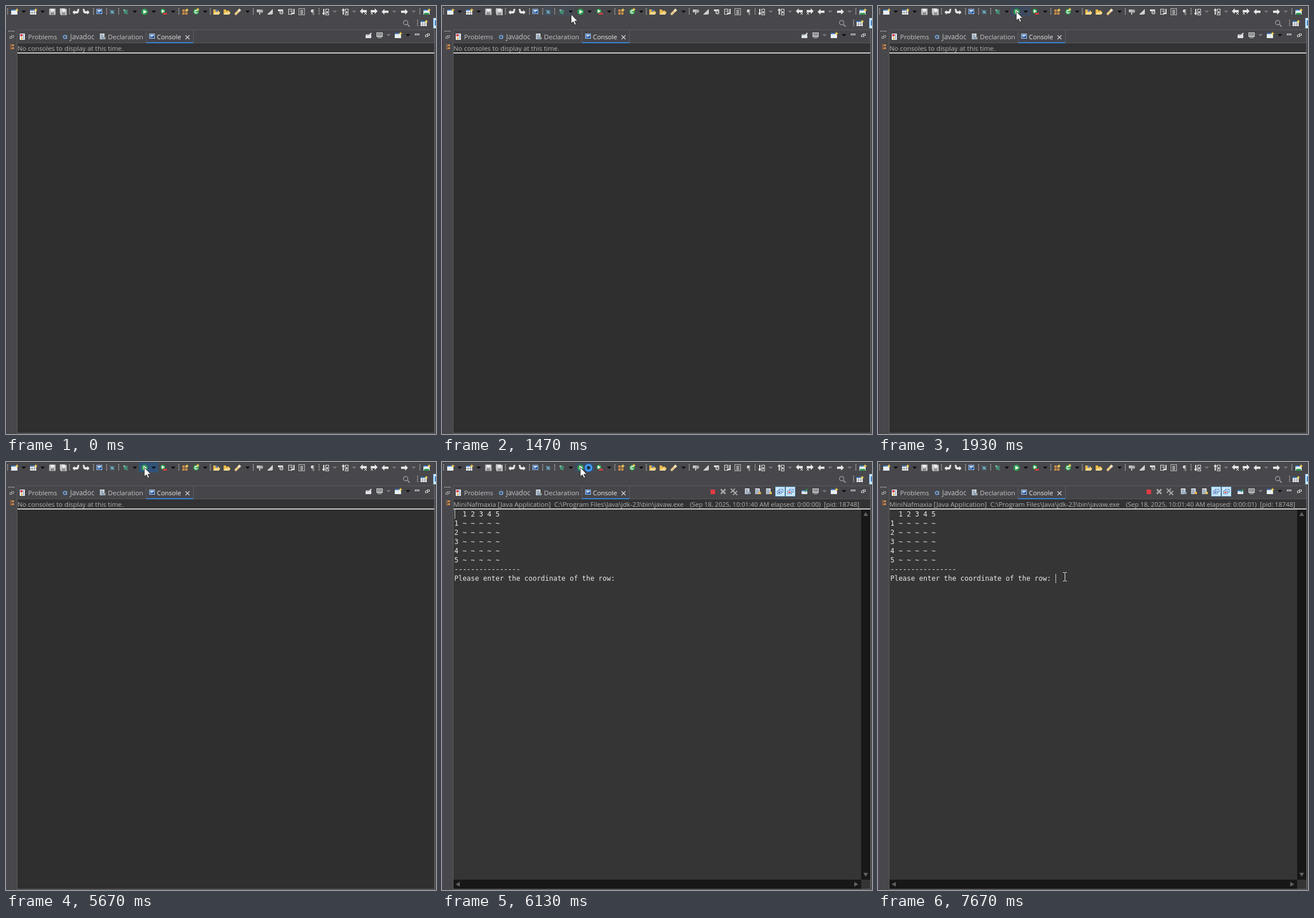
Animation of 751 by 746 pixels, one loop 8000 ms. Source, as an HTML page with a canvas:

```html
<!DOCTYPE html>
<html lang="en">
<head>
<meta charset="utf-8">
<title>Console</title>
<style>
html, body { margin: 0; width: 100%; height: 100%; overflow: hidden; background: #48484c; }
canvas { display: block; }
</style>
</head>
<body>
<canvas id="stage" width="751" height="746"></canvas>
<script>
const g = document.getElementById('stage').getContext('2d');
const UI = '"Open Sans", "Noto Sans", sans-serif', MONO = '"DejaVu Sans Mono", monospace';
const BAR = '#48484c', WHITE = '#e6e6e6', GREY = '#9a9a9a', BLUE = '#3d7cc9', GOLD = '#e8b64c', GREEN = '#2f9e4f';

// Drawing helpers
function rect(x, y, w, h, c) { g.fillStyle = c; g.fillRect(x, y, w, h); }
function trace(p, x, y) {
  g.beginPath();
  for (let i = 0; i < p.length; i += 2) g.lineTo(x + p[i], y + p[i + 1]);
}
function poly(x, y, p, c) { trace(p, x, y); g.closePath(); g.fillStyle = c; g.fill(); }
function line(x, y, p, c, w = 1) { trace(p, x, y); g.strokeStyle = c; g.lineWidth = w; g.stroke(); }
function disc(x, y, r, c) { g.beginPath(); g.arc(x, y, r, 0, 7); g.fillStyle = c; g.fill(); }
function ring(x, y, r, c, w) { g.beginPath(); g.arc(x, y, r, 0, 7); g.strokeStyle = c; g.lineWidth = w; g.stroke(); }
function box(x, y, w, h, c) { g.strokeStyle = c; g.lineWidth = 1; g.strokeRect(x + .5, y + .5, w - 1, h - 1); }
function text(s, x, y, c, size = 11.45, font = UI) {
  g.font = size + 'px ' + font; g.fillStyle = c; g.fillText(s, x, y);
}

// Icons, placed by their centre
function drop(x, y, c = '#0c0c0c') { poly(x, y, [-4, -2, 4, -2, 0, 2], c); }
function dots(x, y) { for (let i = -6; i <= 5; i += 3) rect(x - 1, y + i, 1.5, 1.5, '#c4c4c4'); }
function star(x, y) {
  poly(x, y, [-3.5, 0, -1, -1, 0, -3.5, 1, -1, 3.5, 0, 1, 1, 0, 3.5, -1, 1], '#f2cf55');
}
function pane(x, y, cells) {
  rect(x - 6, y - 4, 11, 9, '#e8eef2');
  rect(x - 6, y - 4, 11, 2, BLUE);
  if (cells) { rect(x - 3, y - 2, 1, 7, GREY); rect(x - 6, y + 1, 11, 1, GREY); rect(x + 1, y - 2, 1, 7, GREY); }
  star(x + 4, y - 3);
}
function floppy(x, y) {
  rect(x - 5.5, y - 5.5, 11, 11, '#c5c5c8');
  rect(x - 3, y - 5, 6, 4, '#eeeeee');
  rect(x - 3, y + 1, 6, 4, '#909094');
}
function page(x, y, c) {
  rect(x - 5, y - 5, 8, 10, '#d5dae0');
  for (let i = -3; i < 4; i += 2) rect(x - 4, y + i, 5, 1, '#7186a0');
  rect(x + 1, y + 1, 4, 4, c);
}
function curl(x, y, d) {
  poly(x, y, [-6 * d, 2, -2 * d, -2, -2 * d, 0, 2 * d, 0, 3 * d, -4, 6 * d, -4, 5 * d, 2, 3 * d, 4, -2 * d, 4, -2 * d, 6], WHITE);
}
function arrow(x, y, d) {
  poly(x, y, [-6 * d, 0, -1 * d, -5, -1 * d, -2, 6 * d, -2, 6 * d, 2, -1 * d, 2, -1 * d, 5], WHITE);
}
function screen(x, y) {
  rect(x - 5, y - 5, 10, 9, '#a9c6ea');
  rect(x - 4, y - 4, 8, 7, '#24559f');
  rect(x - 3, y - 3, 6, 2, '#fff');
  rect(x - 3, y, 4, 1, '#fff');
}
function folder(x, y) {
  poly(x, y, [-6, -4, -2, -4, -1, -2, 4, -2, 4, 0, 6, 0, 4, 5, -6, 5], GOLD);
  poly(x, y, [-3, 1, 6, 1, 4, 5, -6, 5], '#f6dc94');
}
function cross(x, y, c, r, w) { line(x, y, [-r, -r, r, r], c, w); line(x, y, [-r, r, r, -r], c, w); }
function restore(x, y, c) { box(x - 1, y - 3, 5, 4, c); rect(x - 4, y - 1, 5, 4, BAR); box(x - 4, y - 1, 5, 4, c); }
function monitor(x, y) {
  rect(x - 5, y - 5, 11, 8, '#c7c7c7'); rect(x - 4, y - 4, 9, 5, '#8e9296'); rect(x - 3, y + 4, 7, 1, '#c7c7c7');
}
function pin(x, y, on) {
  rect(x - 5, y - 2, 10, 7, '#dce3e8');
  rect(x - 5, y - 2, 10, 2, on ? BLUE : GREY);
  line(x, y, [1, 1, 5, -4], on ? GREEN : '#f0f0f0', 2);
}

function toolbar() {
  for (const x of [3, 111, 153, 176, 197, 302, 357, 432, 547, 723]) dots(x, 10);
  for (const x of [31, 64, 225, 258, 292, 348, 422]) drop(x, 10);
  for (const x of [574, 608, 678, 712]) drop(x, 10, '#77777b');
  pane(15, 10); pane(48, 10, true);
  floppy(81, 10);
  rect(94, 4, 9, 9, '#c5c5c8'); rect(96, 6, 10, 10, '#77777b'); floppy(100.5, 10.5);
  curl(122, 9, 1); curl(140, 9, -1);
  screen(163, 10);

  // Skip breakpoints, debug, run, coverage
  rect(182, 7, 7, 7, '#47788f'); disc(185.5, 10.5, 2, '#88a9b8');
  line(185, 10, [-4, -4, 4, 4], '#8fa0a8');
  for (const a of [-3, 0, 3]) line(209, 10 + a, [-3, -1, 4, 1], '#62a08a');
  disc(209, 10.5, 2.8, '#3c9475'); disc(206.5, 7.5, 1.4, '#9bd2a8');
  disc(242, 10, 5.5, GREEN); poly(242, 10, [-2, -3.5, 4, 0, -2, 3.5], '#fff');
  disc(274, 9, 4.2, GREEN); poly(274, 9, [-2, -3, 3, 0, -2, 3], '#fff');
  rect(274, 12, 7, 3, '#d33d3d');

  for (const [i, j] of [[0, 0], [5, 0], [0, 5], [5, 5]]) rect(308 + i, 6 + j, 4, 4, '#c98d48');
  star(316, 7);
  disc(332, 10, 5, GREEN); ring(332, 10, 2.2, '#fff', 1.4); rect(333, 9, 2, 2, GREEN); star(335, 6);
  folder(368, 10); disc(368, 8, 2, '#4a78b8'); folder(386, 10);
  line(405, 10, [-5, 5, 4, -4], '#e6c78a', 4); line(405, 10, [1, -1, 4, -4], '#f3e6c0', 4);

  // Editing tools
  rect(438, 6, 6, 5, '#c2c2c2'); disc(446, 9, 3, '#aaa'); rect(442, 11, 2, 4, '#bbb');
  poly(461, 10, [-5, 5, 5, -5, 5, 4, 1, 5], '#d2d2d2');
  rect(475, 6, 9, 3, WHITE); disc(481, 11, 3.5, '#bbb'); disc(481, 11, 1.5, '#555');
  box(493, 5, 7, 10, WHITE); line(498, 10, [-3, -1, 1, -1], WHITE); line(498, 10, [5, -5, 5, 3, 0, 3], WHITE, 2);
  box(511, 4, 11, 12, '#bdbdbd'); for (let y = 7; y < 14; y += 2) rect(514, y, 5, 1, '#ddd');
  text('¶', 532, 14, WHITE, 11);
  for (const [x, d] of [[558, 1], [592, -1]]) {
    box(x, 5, 6, 11, WHITE); rect(x + 2, 9, 2, 4, WHITE);
    line(x - 3, 10, [0, -5, 0, 5], WHITE, 2);
    poly(x - 3, 10 + d * 2, [-3, 0, 3, 0, 0, 4 * d], WHITE);
  }
  arrow(624, 9, 1); arrow(643, 9, -1);
  for (const x of [628, 639]) cross(x, 13, WHITE, 2, 1);
  arrow(662, 10, 1); arrow(696, 10, -1);
  pane(735, 10); rect(730, 12, 9, 3, GREEN);

  // Second row and side strip
  ring(698, 29, 3.8, '#96969a', 1.4); line(701, 32, [0, 0, 4, 4], '#96969a', 1.8);
  dots(719, 30); pane(730, 30, true);
  rect(746, 21, 5, 18, '#cce8ff'); rect(746, 21, 1, 18, '#75b7eb'); rect(749, 25, 2, 9, BLUE);
  for (let x = 4; x < 16; x += 3) rect(x, 43, 1.5, 1.5, '#c4c4c4');
  restore(10, 54, '#a5a5a5');
  line(8, 71, [0, -5, 0, 4, 2, 4], '#bd7940'); line(8, 71, [0, -2, 3, -2], '#bd7940');
  rect(10, 67, 4, 3, '#d88b45'); rect(10, 72, 4, 3, '#d88b45');
}

function tabs() {
  rect(20, 42, 728, 23, '#46464a');
  rect(19, 41, 730, 1, '#5c5c60');
  rect(244, 42, 1, 22, '#5c5c60'); rect(327, 42, 1, 22, '#5c5c60');
  rect(20, 64, 728, 1, '#56565a');
  rect(245, 63, 82, 2, '#3c82d0');
  const tab = '#c6c6c8';
  text('Problems', 38.5, 58, tab); text('Javadoc', 112, 58, tab, 11.9);
  text('Declaration', 178, 58, tab, 11.55); text('Console', 263.5, 58, '#ededed', 11.3);
  rect(24, 48, 9, 11, '#e9edf2'); disc(27, 51, 2.3, '#d84343'); rect(26, 55, 3, 3, GOLD); rect(30, 49, 1, 9, '#6e93c4');
  ring(103, 54, 2.7, '#75aee6', 1.5); rect(105, 51, 1.5, 6, '#75aee6');
  page(169, 53, GOLD); ring(171, 56, 2, '#5591d0', 1.2);
  screen(255, 53);
  cross(317, 54.5, '#d2d2d2', 3.5, 1.2);
}

function viewTools(live) {
  pin(633, 51, live); monitor(652, 51); drop(668, 51, '#77777b');
  pane(685, 51); drop(702, 51);
  box(714, 48, 8, 3, '#d5d5d5'); restore(736, 51, '#d5d5d5');
  if (!live) return;
  rect(469, 48, 8, 8, '#e33b44');
  cross(491, 51.5, '#a8a8a8', 4, 2.6);
  cross(508, 50, '#a8a8a8', 3.6, 2); cross(512, 54, '#a8a8a8', 3.6, 2);
  page(534, 51, '#8ca3bd'); page(552, 51, GOLD); page(571, 51, '#e2c35c');
  for (const [x, c] of [[582, '#3c6fae'], [600, '#d24545']]) {
    rect(x, 43, 17, 17, '#cce8ff'); box(x, 43, 17, 17, '#84c1ee');
    box(x + 6, 47, 8, 6, '#4f83c2');
    rect(x + 3, 50, 8, 6, '#f4f8ff'); box(x + 3, 50, 8, 6, '#4f83c2'); rect(x + 5, 52, 4, 2, c);
  }
}

function output(f) {
  const c = '#b0b0b0';
  text('MiniNafmaxia [Java Application]', 20, 78, c);
  text('C:\\Program Files\\Java\\jdk-23\\bin\\javaw.exe', 196, 78, c);
  text(`(Sep 18, 2025, 10:01:40 AM elapsed: 0:00:0${f < 109 ? 0 : 1})`, 433, 78, c, 11.1);
  text('[pid: 18748]', 667, 78, c, 11.2);

  const rows = ['  1 2 3 4 5'];
  for (let i = 1; i < 6; i++) rows.push(i + ' ~'.repeat(5));
  rows.push('-'.repeat(16), 'Please enter the coordinate of the row: ');
  rows.forEach((s, i) => text(s, 21.5, 95 + 16 * i, '#ebebeb', 11.96, MONO));

  rect(732, 83, 16, 645, '#171717'); rect(20, 728, 712, 16, '#171717');
  const k = '#626262';
  poly(740, 91, [-4, 3, 0, -4, 4, 3], k); poly(740, 719, [-4, -3, 0, 4, 4, -3], k);
  poly(28, 736, [3, -4, -4, 0, 3, 4], k); poly(723, 736, [-3, -4, 4, 0, -3, 4], k);

  if (f >= 115) rect(310, 195, 1, 16, '#d0d0d0');
  else if (f < 100 || f >= 108) rect(22, 83, 1, 16, '#d0d0d0');
}

// Pointer waypoints: step, x, y
const runs = [
  [[12, 738, 728], [15, 415, 118]],
  [[21, 186, 4], [22, 225, 14], [24, 236, 15], [29, 241, 9], [96, 241, 9],
   [97, 244, 14], [101, 308, 185], [102, 319, 217], [104, 326, 200], [120, 326, 200]]
];
function pointer(f) {
  for (const r of runs) for (let i = 1; i < r.length; i++) {
    const [a, x, y] = r[i - 1], [b, u, v] = r[i];
    if (f >= a && f <= b) { const k = (f - a) / (b - a); return [x + (u - x) * k, y + (v - y) * k]; }
  }
}
function drawPointer(f) {
  const at = pointer(f);
  if (!at) return;
  const x = Math.round(at[0]), y = Math.round(at[1]);
  if (f > 98) {
    for (const d of [-8, 7]) { rect(x - 3, y + d, 3, 1, WHITE); rect(x + 1, y + d, 3, 1, WHITE); }
    rect(x, y - 7, 1, 14, WHITE);
    return;
  }
  const shape = [0, 0, 0, 16, 3.7, 12.7, 6.3, 18.5, 8.8, 17.4, 6.3, 11.8, 11.3, 11.8];
  poly(x + .5, y + .5, shape, '#fff');
  line(x + .5, y + .5, [...shape, 0, 0], '#111', .8);
  if (f >= 88 && f < 97) {
    disc(256, 10, 7.5, '#1c5fa8'); ring(256, 10, 5, '#4a9be8', 3.2); disc(256, 10, 2.4, '#1d2c3c');
  }
}

function hover(f) {
  const mark = (x, w, c) => rect(x, 1, w, 17, c);
  if (f === 21 || f === 22) mark(177, 17, '#464c55');
  if (f >= 22 && f < 24) mark(201, 30, '#464c55');
  if (f >= 24 && f < 97) mark(232, 34, f >= 85 && f < 89 ? '#2f5379' : '#3d4b5e');
}

function draw() {
  const t = performance.now() % 8000;
  const f = Math.floor((t + 5) * 15 / 1000); // 15 steps a second
  const live = f >= 92;
  rect(0, 0, 751, 746, BAR);
  rect(0, 0, 751, 1, '#3c3c40');
  rect(0, 42, 1, 704, f < 85 ? '#3d2946' : '#54435c');
  hover(f);
  toolbar();
  tabs();
  viewTools(live);
  rect(20, 65, 728, 679, live ? '#353535' : '#2f2f2f');
  rect(20, 65, 728, 16, '#323234');
  rect(20, 81, 728, 1.6, '#ececec');
  rect(19, 42, 1, 703, '#5c5c60'); rect(748, 42, 1, 703, '#707074'); rect(19, 744, 730, 1, '#66666a');
  if (live) output(f);
  else text('No consoles to display at this time.', 20, 78, '#b0b0b0');
  drawPointer(f);
  requestAnimationFrame(draw);
}
draw();
</script>
</body>
</html>
```
